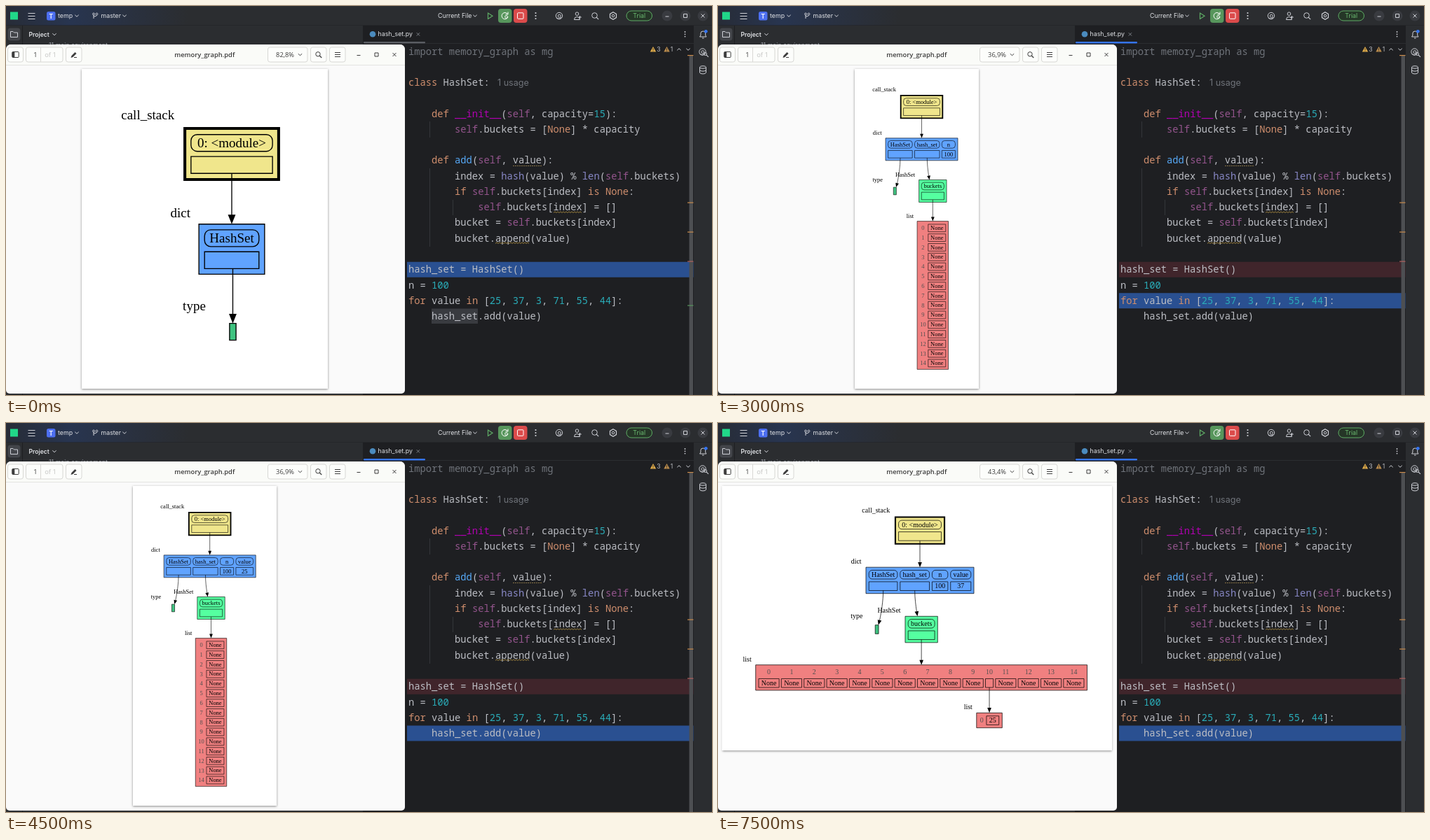
Recreate the animation shown at these times as an HTML page with a canvas. Size 1007 by 556 pixels, loop 8 s.

```html
<!DOCTYPE html>
<html lang="en">
<head>
<meta charset="utf-8">
<title>Hash set in a debugger</title>
<style>
html, body { margin: 0; height: 100%; overflow: hidden; background: #1e1f22; }
canvas { display: block; }
</style>
</head>
<body>
<canvas width="1007" height="556"></canvas>
<script>
const ctx = document.querySelector('canvas').getContext('2d');
const UI = 'Inter, sans-serif';
const GTK = '"Open Sans", sans-serif';
const SERIF = '14px "Liberation Serif", serif';
const MONO = '13.77px "Noto Sans Mono", monospace';
const MENU = `8.8px ${UI}`;
const CHAR = 8.262, CODE_X = 574, CODE_Y = 65, LINE = 22.26;

const PALE = '#ced0d6', DIM = '#6f737a', TEXT = '#bcbec4';
const COLORS = { k: '#cf8e6d', s: '#94558d', n: '#2aacb8', b: '#8888c6', f: '#56a8f5', m: '#b200b2', d: DIM };

// Code lines; {x:...} colours a span.
const CODE = [
  '{d:import memory_graph as mg}', '',
  '{k:class} HashSet:', '',
  '    {k:def} {m:__init__}({s:self}, capacity={n:15}):',
  '        {s:self}.buckets = [{k:None}] * capacity', '',
  '    {k:def} {f:add}({s:self}, value):',
  '        index = {b:hash}(value) % {b:len}({s:self}.buckets)',
  '        {k:if} {s:self}.buckets[index] {k:is None}:',
  '            {s:self}.buckets[index] = []',
  '        bucket = {s:self}.buckets[index]',
  '        bucket.append(value)', '',
  'hash_set = HashSet()',
  'n = {n:100}',
  '{k:for} value {k:in} [{n:25}, {n:37}, {n:3}, {n:71}, {n:55}, {n:44}]:',
  '    hash_set.add(value)'
];

const small = { zoom: '36,9%', scale: 0.605, height: 457, value: 25 };
const wide = { zoom: '43,4%', scale: 0.711, height: 378, cx: 288, left: 5.5, right: 562, vars: 4, filled: true };
const STEPS = [
  { zoom: '82,8%', scale: 1.357, height: 457, cx: 322, left: 108, right: 459, vars: 1, line: 14 },
  { ...small, cx: 291.8, left: 196, right: 371.5, vars: 2, line: 15 },
  { ...small, cx: 290.5, left: 195, right: 372, vars: 3, line: 16 },
  { ...small, cx: 290.7, left: 181, right: 386, vars: 4, line: 17 },
  { ...wide, value: 25, line: 16 },
  { ...wide, value: 37, line: 17 }
];

function text(str, x, y, color, font, align = 'left') {
  ctx.font = font;
  ctx.fillStyle = color;
  ctx.textAlign = align;
  ctx.fillText(str, x, y);
}

function box(x, y, w, h, fill, stroke, r = 0, pen = 1) {
  ctx.beginPath();
  ctx.roundRect(x, y, w, h, r);
  paint(fill, stroke, pen);
}

function paint(fill, stroke, pen = 1) {
  if (fill) { ctx.fillStyle = fill; ctx.fill(); }
  if (stroke) { ctx.strokeStyle = stroke; ctx.lineWidth = pen; ctx.stroke(); }
}

function disc(x, y, r, fill, stroke, pen) {
  ctx.beginPath();
  ctx.arc(x, y, r, 0, 7);
  paint(fill, stroke, pen);
}

function line(d, color, pen = 1) {
  ctx.strokeStyle = color;
  ctx.lineWidth = pen;
  ctx.stroke(new Path2D(d));
}

function shape(d, color) {
  ctx.fillStyle = color;
  ctx.fill(new Path2D(d));
}

const chevron = (x, y, color = PALE, h = 2.5) =>
  line(`M${x - 2.7} ${y - h / 2}l2.7 ${h}l2.7 ${-h}`, color);

function swirl(x, y) {
  disc(x, y, 4.7, null, PALE);
  disc(x + 0.3, y + 0.3, 2, null, PALE);
  line(`M${x - 4} ${y + 3}q5 3 7 -1`, PALE);
}

function lens(x, y, r, color) {
  disc(x, y, r, null, color);
  line(`M${x + r * 0.7} ${y + r * 0.7}l3 3`, color, 1.2);
}

function windowButtons(min, max, close, y, color) {
  line(`M${min - 2.5} ${y + 1}h5M${max - 2.5} ${y - 2.5}h5v5h-5zM${close - 2.5} ${y - 2.5}l5 5m0 -5l-5 5`, color);
}

function drawTopBar() {
  const glow = ctx.createLinearGradient(0, 0, 260, 0);
  glow.addColorStop(0, '#272c37');
  glow.addColorStop(0.35, '#283550');
  glow.addColorStop(1, '#2b2d30');
  box(0, 0, 1007, 27.5, glow);
  box(6, 8.5, 11, 11, '#21d789');
  line('M31.5 10.5h10M31.5 14.5h10M31.5 18.5h10', PALE, 1.1);

  box(58, 8, 12.5, 12.5, '#4d6ff0', null, 2.5);
  text('T', 64.3, 17.7, '#fff', `600 9px ${UI}`, 'center');
  text('temp', 74, 17.3, '#dfe1e5', MENU);
  chevron(101, 14);
  disc(125, 11.5, 1.4, null, PALE);
  disc(129.5, 11.5, 1.4, null, PALE);
  line('M125 13v5M129.5 13q0 2 -4.5 2', PALE);
  text('master', 135.5, 17.3, '#dfe1e5', MENU);
  chevron(169, 14);

  text('Current File', 616, 17.3, '#dfe1e5', MENU);
  chevron(669, 14);
  line('M687.5 10v8.4l6.5 -4.2z', '#5fad65', 1.2);
  box(702, 4, 19.5, 20, '#57965c', null, 4);
  line('M715.5 11.5a4.6 4.6 0 1 0 .6 4M716 8.5v3.5h-3.5', '#fff');
  disc(713.5, 15.5, 1.8, null, '#fff');
  box(724, 4, 19.5, 20, '#db4b4b', null, 4);
  box(729.5, 9.8, 8.5, 8.5, null, '#fff', 1);
  for (const y of [10, 14, 18]) disc(755.5, y, 1.1, PALE);

  swirl(789, 14);
  disc(814.5, 11.2, 2.3, null, PALE);
  line('M810.5 19.5q0 -4 4 -4t4 4zM818.5 14v4M816.8 16h4', PALE);
  lens(839.5, 13.5, 3.8, PALE);
  line('M866 8.8l4.5 2.6v5.2l-4.5 2.6l-4.5 -2.6v-5.2z', PALE, 1.2);
  disc(866, 14, 1.8, null, PALE);
  box(885, 7, 36.5, 14, '#253627', '#5fad65', 7);
  text('Trial', 903.2, 17.3, '#6cbc72', MENU, 'center');
  for (const x of [943, 969, 994]) disc(x, 14, 7.5, '#393b40');
  windowButtons(943, 969, 994, 14, PALE);
}

function drawFrame(active) {
  box(0, 0, 1007, 556, '#1e1f22');
  drawTopBar();
  box(0, 28, 509, 528, '#2b2d30');
  box(23, 28, 1, 528, '#1e1f22');
  box(2.5, 31.5, 18, 18, '#43454a', null, 4);
  line('M6.5 36.5h3.5l1.5 1.5h5v6.5h-10z', PALE);
  text('Project', 32.5, 43.5, '#dfe1e5', `600 8.6px ${UI}`);
  chevron(69, 40.5);
  text('11 main environment', 61, 59, '#9da0a8', MENU);

  disc(523, 40.3, 4.3, '#4b8bbe');
  text('hash_set.py', 530.5, 43.3, '#dfe1e5', MENU);
  line('M585.7 38.2l4.4 4.4m0 -4.4l-4.4 4.4', '#868a91', 0.9);
  box(510, 51, 88, 2.5, active ? '#3574f0' : '#5a5d63', null, 1);
  for (const y of [37, 40.3, 43.6]) disc(968.5, y, 0.9, PALE);
  box(598, 53, 383, 1, '#2b2d30');

  box(981, 28, 26, 528, '#2b2d30');
  line('M989.5 44h9.5l-1.3 -2v-3q0 -3 -3.4 -3t-3.4 3v3zM993 46h2.5', PALE);
  disc(998.3, 36.3, 2.4, '#3574f0');
  swirl(993.5, 65.5);
  lens(997.5, 68.5, 2, PALE);
  ctx.beginPath();
  ctx.ellipse(994, 87.5, 4.5, 1.8, 0, 0, 7);
  paint(null, PALE);
  line('M989.5 87.5v7.5q0 2 4.5 2t4.5 -2v-7.5M989.5 91.2q0 2 4.5 2t4.5 -2', PALE);
}

function drawCodeLine(str, y) {
  let col = 0;
  for (const [, kind, span, plain] of str.matchAll(/\{(\w):([^}]+)\}|([^{]+)/g)) {
    const part = span || plain;
    text(part, CODE_X + col * CHAR, y, COLORS[kind] || TEXT, MONO);
    col += part.length;
  }
}

function wave(x, y, w) {
  let d = `M${x} ${y}`;
  for (let i = 0; i < w / 4; i++) d += 'l2 -1.6l2 1.6';
  line(d, '#a8893f', 0.9);
}

function drawEditor(current) {
  const top = i => CODE_Y + i * LINE - 11;
  const first = current === 14;
  line('M604.5 165v23M604.5 232v112M637.5 277v22', '#34363a');
  if (first) box(607, top(17), 66, 21.5, '#393b40');
  else box(572, top(14), 408.5, 22, '#40252b');
  box(572, top(current), 408.5, 22, '#2a5091');
  box(974.5, 71, 5.5, 485, '#4d4f52');

  CODE.forEach((str, i) => drawCodeLine(str, CODE_Y + i * LINE + 4.6));
  text('1 usage', 701, 113.7, DIM, `12.6px ${UI}`);
  ctx.setLineDash([2, 1]);
  line('M723 228.5h41', '#857042');
  ctx.setLineDash([]);
  wave(781, 295.5, 40);
  wave(698, 339.5, 48);

  for (const [x, n, color] of [[919, 3, '#e0ac4a'], [938.5, 1, '#b98b4c']]) {
    shape(`M${x + 4} 58l4.2 7.6h-8.4z`, color);
    line(`M${x + 4} 60.5v2.3m0 .8v1`, '#1e1f22', 0.9);
    text(n, x + 9.3, 65.3, TEXT, `8.6px ${UI}`);
  }
  chevron(960, 62, PALE, -2.5);
  chevron(973, 62);
  const mark = (y, color) => box(972, y, 8.5, 1.2, color);
  for (const y of [70, 280.5, 322.5]) mark(y, '#c98a4b');
  mark(364.5, '#b0605f');
  if (current === 15) mark(385.5, '#b0605f');
  if (first) mark(427.5, '#57965c');
}

function drawViewer(zoom) {
  const ink = '#3d3d3d', edge = '#d8d8d5';
  box(0, 55, 569, 499, '#fafafa', null, [7, 7, 5, 5]);
  box(0, 55, 569, 29, '#fafbf8', null, [7, 7, 0, 0]);
  box(0, 84, 569, 0.8, '#dcdcd9');
  for (const [x, w] of [[2.5, 22], [28.5, 52.5], [85.5, 22.5], [373.5, 56.5], [434.5, 22.5], [461.5, 22.5]])
    box(x, 59, w, 21, '#fcfdfb', edge, 3);
  line('M49.5 59v21', edge);

  box(8.7, 65.5, 9.5, 8, null, ink, 1);
  box(9, 66, 3.3, 7, ink);
  text('1', 42, 73, ink, `9.3px ${GTK}`, 'center');
  text('of 1', 63.5, 73, '#c4c4c2', `9.3px ${GTK}`, 'center');
  shape('M92.5 74l1 -3l5 -5l2 2l-5 5z', ink);
  line('M97 73.5h4', ink);
  text('memory_graph.pdf', 283.3, 73, ink, `600 9.4px ${GTK}`, 'center');
  text(zoom, 398, 73, ink, `9.3px ${GTK}`, 'center');
  chevron(419.5, 69.5, ink);
  lens(445, 68.8, 3.2, ink);
  line('M469 66.5h8M469 69.5h8M469 72.5h8', ink);
  windowButtons(503, 528.5, 554, 69.5, ink);
}

// Graph helpers work in page units: font size 14, pen 1.
const CELL = 17.7, GAP = 5.5;
const textWidth = str => { ctx.font = SERIF; return ctx.measureText(str).width; };
const label = (str, x, y) => text(str, x, y, '#000', SERIF, 'right');

function cell(str, x, y, w, r = 0) {
  box(x, y, w, CELL, null, '#000', r);
  text(str, x + w / 2, y + 13.4, '#000', SERIF, 'center');
}

function node(name, cx, top, entries, fill, pen = 1) {
  const inset = 5.7 + pen / 4;
  const widths = entries.map(e => 9 + 1.5 * pen + Math.max(...e.map(textWidth)));
  const w = widths.reduce((a, b) => a + b + GAP) + 2 * inset;
  const left = cx - w / 2;
  box(left, top, w, 2 * (inset + CELL) + GAP, fill, '#000', 0, pen);
  let x = left + inset;
  entries.forEach(([key, value], i) => {
    cell(key, x, top + inset, widths[i], 6.5);
    cell(value, x, top + inset + CELL + GAP, widths[i]);
    x += widths[i] + GAP;
  });
  label(name, left - 8 - pen, top - 6.5 - pen);
  return left;
}

function arrow(d, tipX, tipY, angle = 0) {
  line(d, '#000');
  ctx.save();
  ctx.translate(tipX, tipY);
  ctx.rotate(angle);
  shape('M0 0l-4 -10h8z', '#000');
  ctx.restore();
}
const down = (x, from, to) => arrow(`M${x} ${from}V${to - 9}`, x, to);

function typeNode(cx, top) {
  box(cx - 3.4, top, 6.8, CELL, '#3fc380', '#000');
  label('type', cx - 28.5, top - 14);
}

const index = (i, x, y) => text(i, x, y, '#505050', SERIF, 'center');

function columnList(cx) {
  box(cx - 36.8, 359.7, 73.5, 350, '#f08080', '#000');
  label('list', cx - 45, 352.7);
  for (let i = 0; i < 15; i++) {
    const y = 366.9 + i * 22.8;
    index(i, cx - 23, y + 13.6);
    cell('None', cx - 10.8, y, 41.2);
  }
}

function rowList(cx) {
  const left = cx - 332.5;
  box(left, 359.7, 665, 51, '#f08080', '#000');
  label('list', left - 8.5, 352.5);
  let x = left + 6;
  for (let i = 0; i < 15; i++) {
    const used = i === 10, w = used ? 15.6 : 41;
    index(i, x + w / 2, 378.7);
    cell(used ? '' : 'None', x, 387.4, w);
    if (used) bucketList(x + w / 2);
    x += w + 4.5;
  }
}

function bucketList(cx) {
  box(cx - 25.7, 456.2, 51.4, 30, '#f08080', '#000');
  label('list', cx - 34, 448.8);
  index(0, cx - 15.2, 475.8);
  cell('25', cx - 5.8, 462.4, 25);
  down(cx, 405, 456);
}

function drawGraph({ scale, cx, left, right, height, vars, value, filled }) {
  ctx.save();
  ctx.shadowColor = 'rgba(0,0,0,.45)';
  ctx.shadowBlur = 3;
  ctx.shadowOffsetY = 1;
  box(left, 90, right - left, height, '#fff');
  ctx.restore();

  ctx.save();
  ctx.translate(cx, 90);
  ctx.scale(scale, scale);
  node('call_stack', 0, 62.6, [['0: <module>', '']], '#f0e68c', 3);
  const entries = [['HashSet', ''], ['hash_set', ''], ['n', '100'], ['value', String(value)]].slice(0, vars);
  const x = node('dict', 0, 163.4, entries, '#60a3ff');
  down(0, 110, 163.4);
  if (vars === 1) {
    typeNode(1.1, 268);
    down(1.1, 210.3, 268);
  } else {
    const mid = x + 111.3;
    typeNode(x + 22, 279.5);
    node('HashSet', mid, 262, [['buckets', '']], '#55ffa0');
    arrow(`M${x + 34.7} 210C${x + 34.7} 231 ${x + 31} 253 ${x + 27.5} 270`, x + 25, 279.5, 0.25);
    arrow(`M${x + 98} 210C${x + 98} 226 ${x + 100} 240 ${x + 101.8} 252.5`, x + 103.4, 262, -0.17);
    (filled ? rowList : columnList)(mid);
    down(mid, 309, 359.7);
  }
  ctx.restore();
}

function draw(now) {
  const step = STEPS[Math.floor(now % 8000 / 1500)];
  drawFrame(step.line !== 14);
  drawEditor(step.line);
  drawViewer(step.zoom);
  drawGraph(step);
  requestAnimationFrame(draw);
}
draw(performance.now());
</script>
</body>
</html>
```
